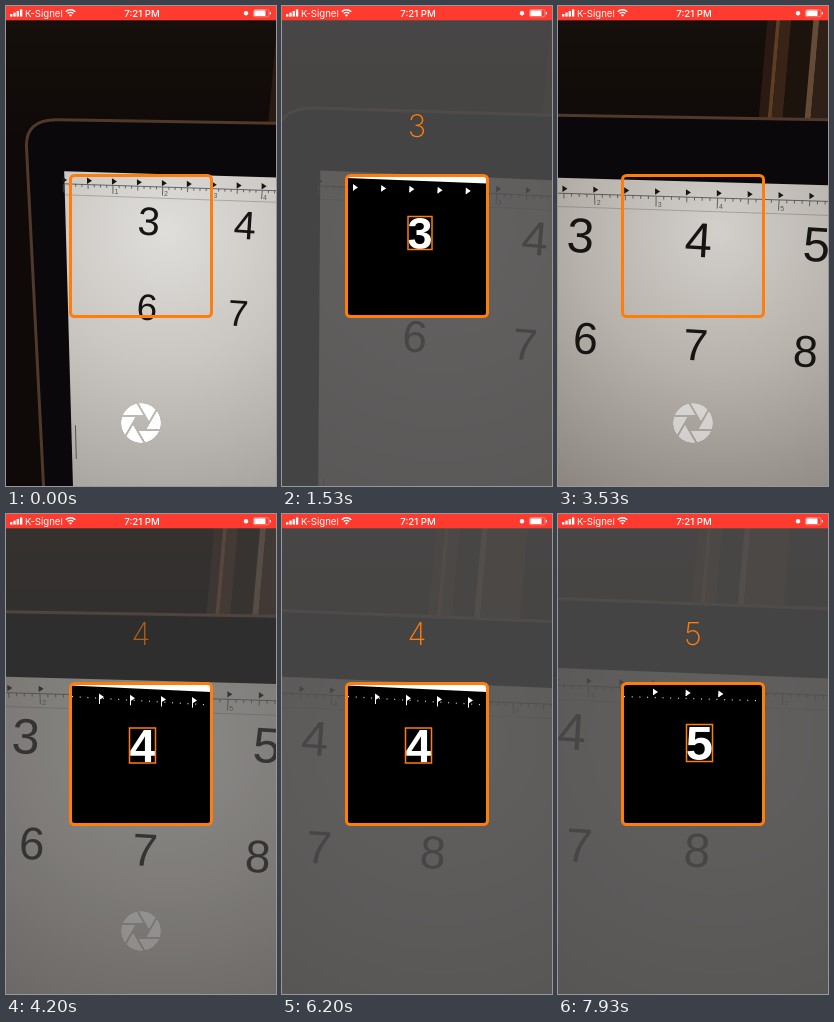
Recreate the animation shown at these times as an HTML page with a canvas. Size 270x480 px, loop 8000 ms.

```html
<!DOCTYPE html>
<html lang="en">
<head>
<meta charset="utf-8">
<title>Digit scanner</title>
<style>
  html, body { margin: 0; width: 100%; height: 100%; overflow: hidden; background: #120c09; }
  canvas { display: block; width: 100vw; height: 100vh; }
</style>
</head>
<body>
<canvas id="stage"></canvas>
<script>
const W = 270, H = 480, LOOP = 8000;
const ORANGE = '#ff7d0a';
const stage = document.getElementById('stage');
const ctx = stage.getContext('2d');

// Camera path: time, then screen x,y of the digits 3, 5, 6 and 8, then dimming.
const CAMERA = [
  [0, 143, 215, 335, 223, 141, 301, 323, 313, 0],
  [800, 138, 227, 362, 236, 134, 328, 352, 342, 0.3],
  [1530, 138, 226, 368, 238, 133, 330, 353, 346, 0.5],
  [1900, 134, 227, 364, 238, 130, 331, 350, 346, 0.6],
  [3300, 24, 230, 260, 239, 29, 333, 249, 346, 1],
  [3530, 22.5, 229, 258.5, 238, 27.5, 332, 247.5, 345, 1],
  [4000, 20, 226, 257, 234, 26, 330, 250, 343, 1],
  [4200, 20, 222, 261, 231, 26, 329, 252, 342, 1],
  [6200, -85, 219, 151, 229, -77, 328, 151, 338, 1],
  [7070, -107, 219, 141, 228.5, -93, 330, 139, 340, 1],
  [7400, -107, 219, 141, 229, -93, 331, 139, 340, 1],
  [7930, -111, 212, 139, 222, -97, 326, 139, 336, 1]
];

// Each scan: press, fade-in and dismissal times, plus the thresholded capture.
const SHOTS = [
  { press: 420, on: 870, off: 2750, digit: '3', x: 138, y: 227, size: 45,
    rect: [126, 210.5, 24, 33], wedge: [172, 177.5], flags: [71, 181.5, 28.2, 0.9, 5] },
  { press: 3480, on: 3980, off: 6290, digit: '4', x: 136.5, y: 231.5, size: 47,
    rect: [123.5, 214, 26, 35], wedge: [171.5, 178], flags: [93, 183, 31, 1.2, 4], dots: [182, 190], stem: 4 },
  { press: 7110, on: 7360, off: 9000, digit: '5', x: 141.5, y: 229, size: 49,
    rect: [128.5, 210.5, 26, 37], flags: [95, 178, 32.7, 1, 3], dots: [182, 186] }
];

const clamp = v => Math.max(0, Math.min(1, v));
const smooth = v => v * v * (3 - 2 * v);
const mix = (a, b, k) => a + (b - a) * k;
const shade = (a, b, k) => `rgb(${a.map((v, i) => Math.round(mix(v, b[i], k)))})`;

function poseAt(t) {
  let i = 0;
  while (i < CAMERA.length - 2 && t >= CAMERA[i + 1][0]) i++;
  const a = CAMERA[i], b = CAMERA[i + 1];
  const k = smooth(clamp((t - a[0]) / (b[0] - a[0])));
  return a.slice(1).map((v, j) => mix(v, b[j + 1], k));
}

// Maps sheet columns u and rows v to the screen.
function projector([ax, ay, bx, by, cx, cy, dx, dy]) {
  return (u, v) => [
    mix(mix(ax, bx, u / 2), mix(cx, dx, u / 2), v),
    mix(mix(ay, by, u / 2), mix(cy, dy, u / 2), v)
  ];
}

function trace(points) {
  ctx.beginPath();
  points.forEach(p => ctx.lineTo(...p));
}
function fillShape(points, color) {
  trace(points);
  ctx.closePath();
  ctx.fillStyle = color;
  ctx.fill();
}
function strokeLine(points, color, width) {
  trace(points);
  ctx.strokeStyle = color;
  ctx.lineWidth = width;
  ctx.stroke();
}
function label(text, x, y, font, color, align = 'center') {
  ctx.font = font;
  ctx.textAlign = align;
  ctx.fillStyle = color;
  ctx.fillText(text, x, y);
}
const sans = (size, weight = 400) => `${weight} ${size}px "Liberation Sans", Arial, sans-serif`;

// The room is far behind the sheet, so its bars move about half as fast.
function drawRoom(at) {
  const g = ctx.createLinearGradient(0, 0, 0, 130);
  g.addColorStop(0, '#17100c');
  g.addColorStop(1, '#0f0a08');
  ctx.fillStyle = g;
  ctx.fillRect(0, 0, W, H);
  const left = 193 + at(0, 0)[0] * 0.515;
  const bars = [[0, 9, '#2a1a11'], [9, 13, '#5e3d25'], [13, 24, '#382317'],
    [24, 46, '#1d130d'], [46, 52, '#644b38'], [52, 92, '#2f2017']];
  for (const [from, to, color] of bars) {
    const x0 = left + from, x1 = left + to;
    fillShape([[x0 + 6, 0], [x1 + 6, 0], [x1 - 5, 125], [x0 - 5, 125]], color);
  }
}

function drawBezel(at) {
  ctx.beginPath();
  ctx.moveTo(...at(-1.24, 4));
  ctx.lineTo(...at(-1.24, -0.82));
  ctx.quadraticCurveTo(...at(-1.24, -1.16), ...at(-0.92, -1.16));
  ctx.lineTo(...at(5, -1.16));
  ctx.lineTo(...at(5, 4));
  ctx.closePath();
  ctx.fillStyle = '#0a080b';
  ctx.fill();
  ctx.strokeStyle = '#50392b';
  ctx.lineWidth = 3;
  ctx.stroke();
}

function drawSheet(at, dim) {
  const g = ctx.createRadialGradient(160, 225, 0, 160, 225, 310);
  g.addColorStop(0, shade([224, 222, 218], [211, 207, 202], dim));
  g.addColorStop(0.45, shade([200, 197, 193], [183, 178, 172], dim));
  g.addColorStop(1, shade([160, 157, 153], [138, 131, 125], dim));
  fillShape([at(-0.87, -0.55), at(5, -0.55), at(5, 4), at(-0.87, 4)], g);
  strokeLine([at(-0.82, 2.46), at(-0.82, 2.86)], '#55524f', 1);
  drawRuler(at);

  const angle = 1.6 * Math.atan2(at(2, 0)[1] - at(0, 0)[1], at(2, 0)[0] - at(0, 0)[0]);
  for (let n = 0; n < 6; n++) {
    const col = n % 3, row = Math.floor(n / 3);
    const size = (at(1, row)[0] - at(0, row)[0]) * (row ? 0.405 : 0.414);
    ctx.save();
    ctx.translate(...at(col, row));
    ctx.rotate(angle);
    label(n + 3, 0, size * 0.355, sans(size), '#171514');
    ctx.restore();
  }
}

function drawRuler(at) {
  strokeLine([at(-0.87, -0.27), at(5, -0.27)], 'rgba(90,88,86,.45)', 0.8);
  strokeLine([at(-0.87, -0.4), at(5, -0.4)], 'rgba(50,48,46,.75)', 0.9);
  for (let i = 0; i <= 72; i++) {
    const inch = i / 8, u = 0.132 + 0.508 * (inch - 2);
    const depth = i % 8 === 0 ? 0.1 : i % 4 === 0 ? 0.05 : 0.03;
    strokeLine([at(u, -0.4), at(u, -0.4 + depth)], '#4a4846', 0.8);
    if (i && i % 8 === 0) {
      const [x, y] = at(u + 0.015, -0.295);
      label(inch, x, y, sans(7), '#5b5855', 'left');
    }
    if (i % 4 === 0 && inch <= 6) {
      const [x, y] = at(u, -0.445);
      fillShape([[x - 1, y - 3.2], [x + 4, y], [x - 1, y + 3.2]], '#161514');
    }
  }
}

function drawCapture(shot) {
  const { x, y, size, rect, wedge, dots, stem = 0 } = shot;
  ctx.fillStyle = '#000';
  ctx.fillRect(65, 170, 140, 140);
  if (wedge) fillShape([[65, 170], [205, 170], [205, wedge[1]], [65, wedge[0]]], '#fff');
  if (dots) {
    ctx.fillStyle = '#ddd';
    for (let i = 0; i < 18; i++)
      ctx.fillRect(66 + i * 7.7, mix(dots[0], dots[1], i / 17), 1, 1.2);
  }
  const [fx, fy, step, slope, count] = shot.flags;
  for (let i = 0; i < count; i++) {
    const px = fx + step * i, py = fy + slope * i;
    fillShape([[px, py - 3.5], [px + 5, py], [px, py + 3.2]], '#fff');
    ctx.fillRect(px, py, 1, 3 + stem);
  }
  label(shot.digit, x, y + size * 0.355, sans(size, 700), '#fff');
  ctx.strokeStyle = ORANGE;
  ctx.lineWidth = 1.5;
  ctx.strokeRect(...rect);
}

// Shutter icon: a disc with a hexagonal opening and six blade gaps.
const shutter = (() => {
  const c = document.createElement('canvas'), p = c.getContext('2d');
  c.width = c.height = 160;
  p.scale(4, 4);
  p.translate(20, 20);
  p.fillStyle = '#fff';
  p.arc(0, 0, 19.7, 0, Math.PI * 2);
  p.fill();
  p.globalCompositeOperation = 'destination-out';
  p.lineWidth = 2;
  const corner = k => [Math.cos(k * Math.PI / 3) * 8, Math.sin(k * Math.PI / 3) * 8];
  p.beginPath();
  for (let k = 0; k < 6; k++) p.lineTo(...corner(k));
  p.fill();
  for (let k = 0; k < 6; k++) {
    const a = corner(k + 1), b = corner(k);
    p.beginPath();
    p.moveTo(...a);
    p.lineTo(mix(a[0], b[0], 3), mix(a[1], b[1], 3));
    p.stroke();
  }
  return c;
})();

function drawStatusBar() {
  ctx.fillStyle = '#ff3b30';
  ctx.fillRect(0, 0, W, 14.3);
  ctx.fillStyle = '#fff';
  [2.5, 4, 5.6, 7.2].forEach((h, i) => ctx.fillRect(4 + i * 3.3, 10.6 - h, 2.4, h));
  const font = weight => `${weight} 9.6px Inter, "Liberation Sans", sans-serif`;
  label('K-Signel', 19, 10.7, font(400), '#fff', 'left');
  label('7:21 PM', 136, 10.7, font(500), '#fff');

  ctx.strokeStyle = '#fff';
  ctx.lineWidth = 1.5;
  for (const r of [3.8, 6.5]) {
    ctx.beginPath();
    ctx.arc(64.5, 10.2, r, -Math.PI * 0.76, -Math.PI * 0.24);
    ctx.stroke();
  }
  fillShape([[62.9, 8.9], [64.5, 8.2], [66.1, 8.9], [64.5, 10.8]], '#fff');

  ctx.beginPath();
  ctx.arc(240, 7.2, 2.2, 0, Math.PI * 2);
  ctx.fill();
  ctx.strokeStyle = 'rgba(255,255,255,.5)';
  ctx.lineWidth = 0.7;
  ctx.beginPath();
  ctx.roundRect(247.5, 3.6, 15.5, 7.2, 1.8);
  ctx.stroke();
  ctx.fillRect(248.3, 4.4, 11.2, 5.6);
  ctx.fillRect(263.8, 6, 1.1, 2.4);
}

function draw(t) {
  const pose = poseAt(t), at = projector(pose);
  drawRoom(at);
  drawBezel(at);
  drawSheet(at, pose[8]);

  const shot = SHOTS.find(s => t >= s.press && t < s.off + 320);
  const fadeIn = shot ? smooth(clamp((t - shot.on) / 380)) : 0;
  const fadeOut = shot ? 1 - smooth(clamp((t - shot.off) / 320)) : 0;
  const shown = fadeIn * fadeOut;

  ctx.fillStyle = `rgba(80,79,79,${0.86 * shown})`;
  ctx.fillRect(0, 14, W, H - 14);

  const pressed = shot && t < shot.off ? mix(1, 0.5, clamp((t - shot.press) / 50)) : 1;
  ctx.globalAlpha = pressed * (1 - shown);
  ctx.drawImage(shutter, 115, 397, 40, 40);

  if (shot && t >= shot.on) {
    ctx.globalAlpha = fadeOut;
    drawCapture(shot);
    ctx.globalAlpha = shown;
    label(shot.digit, 135, 130.5, '200 31px Inter, Lato, sans-serif', ORANGE);
  }
  ctx.globalAlpha = 1;

  ctx.strokeStyle = ORANGE;
  ctx.lineWidth = 3;
  ctx.beginPath();
  ctx.roundRect(64.5, 169.5, 141, 141, 4);
  ctx.stroke();
  drawStatusBar();
}

function resize() {
  const ratio = window.devicePixelRatio || 1;
  stage.width = Math.round(innerWidth * ratio);
  stage.height = Math.round(innerHeight * ratio);
}
addEventListener('resize', resize);
resize();

const start = performance.now();
function tick() {
  ctx.setTransform(stage.width / W, 0, 0, stage.height / H, 0, 0);
  draw((performance.now() - start) % LOOP);
  requestAnimationFrame(tick);
}
tick();
</script>
</body>
</html>
```
